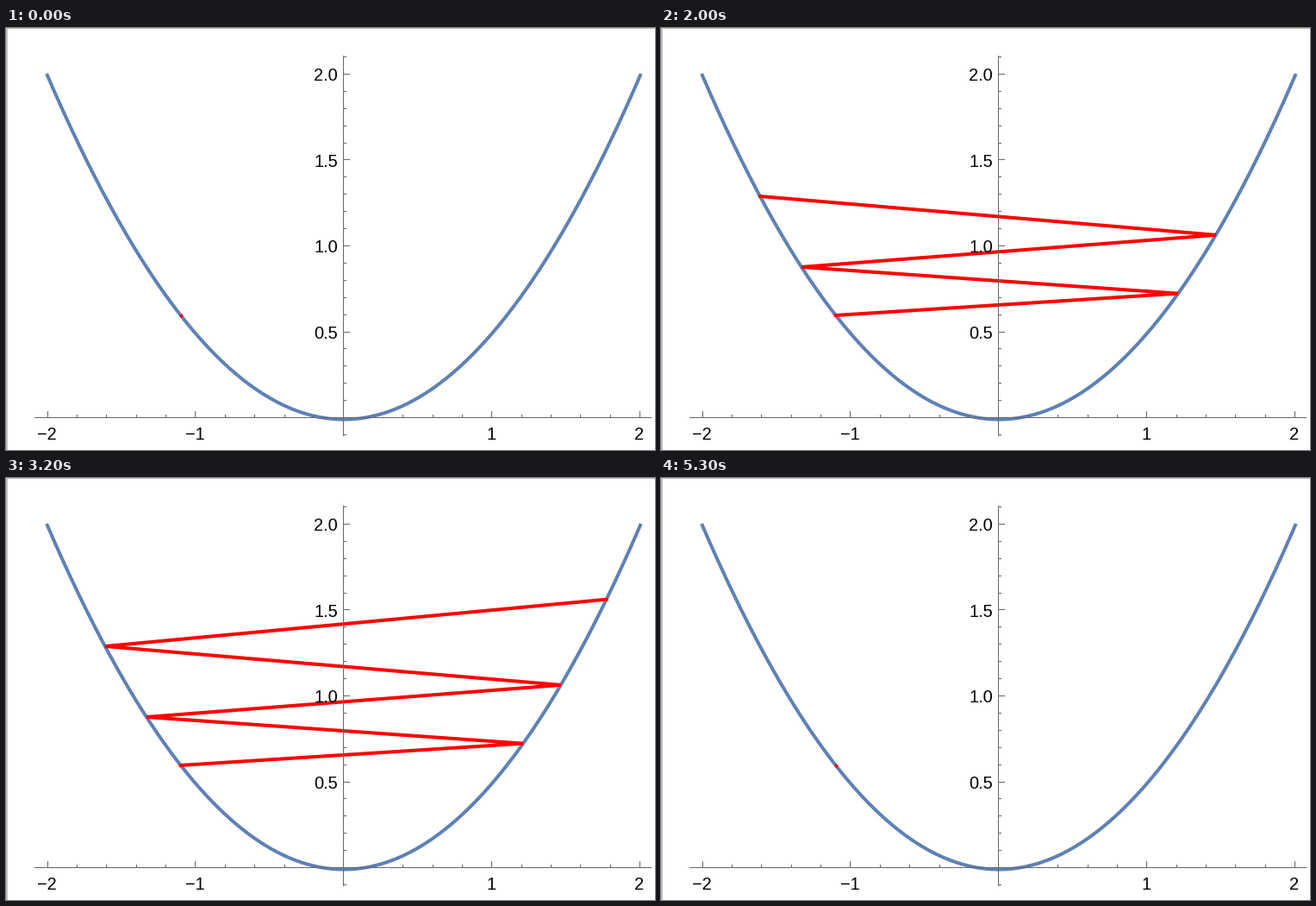
Animation of 753x489 px, one loop 6 s. Source, as a matplotlib script:

```python
import numpy as np
import matplotlib.pyplot as plt
from matplotlib.animation import FuncAnimation
from matplotlib.patches import Rectangle

W, H, DPI = 753, 489, 96
PX = 72 / DPI              # one pixel in points
STEP, LOOP = 100, 6000     # ms
CURVE, AXIS, EDGE = "#5e81b5", "#666666", "#bebebe"
AXIS_X, AXIS_Y = 391, 451  # pixel column and row of the axes

fig = plt.figure(figsize=(W / DPI, H / DPI), dpi=DPI, facecolor="white")
ax = fig.add_axes([0, 0, 1, 1])
ax.set_xlim(0, W)
ax.set_ylim(H, 0)
ax.axis("off")


def to_px(x):
    """Pixel position of the point of the parabola y = x²/2."""
    return 391.9 + 172 * x, 453.6 - 199.4 * x**2 / 2


def box(x, y, w, h, color=AXIS, z=5):
    ax.add_patch(Rectangle((x, y), w, h, fc=color, lw=0, antialiased=False, zorder=z))


def label(x, y, text, ha):
    ax.text(x, y, text, ha=ha, va="baseline", color="black", zorder=6,
            fontfamily="Liberation Sans", fontsize=20 * PX)


def draw_axes():
    box(33, AXIS_Y, 716, 1)
    box(AXIS_X, 32, 1, 441)
    for i in range(-10, 11):
        if i:
            size = 7 if i % 5 == 0 else 3
            box(int(391.9 + 171.9 * i / 5), AXIS_Y - size, 1, size)
    for i in range(-1, 22):
        if i:
            size = 7 if i % 5 == 0 else 3
            box(AXIS_X + 1, round(AXIS_Y - 19.9 * i), size, 1)
    for v in (-2, -1, 1, 2):
        label(390.8 + 171.9 * v, 477, str(v).replace("-", "\u2212"), "center")
    for v in (0.5, 1.0, 1.5, 2.0):
        label(385, 459.3 - 199 * v, f"{v:.1f}", "right")


box(0, 0, W, 1, EDGE, 0)
box(0, 0, 2, H, EDGE, 0)
draw_axes()
ax.plot(*to_px(np.linspace(-2, 2, 300)), color=CURVE, lw=4 * PX,
        solid_capstyle="projecting", zorder=2)

# Each bounce lands on the other side, 1.1 times as far out.
path_x, path_y = to_px(-1.1 * (-1.1) ** np.arange(7))
dot, = ax.plot(path_x[:1], path_y[:1], "o", color="red", ms=4 * PX, mew=0, zorder=3)
zigzag, = ax.plot([], [], color="red", lw=4 * PX, zorder=3,
                  solid_capstyle="projecting", solid_joinstyle="bevel")

GROW = [700, 1200, 1600, 2000, 2400, 2800]
SHRINK = [3200, 3600, 4000, 4400, 4800, 5300]


def update(frame):
    t = frame * STEP
    count = sum(t >= g for g in GROW) - sum(t >= s for s in SHRINK)
    dot.set_visible(count == 0)
    zigzag.set_visible(count > 0)
    zigzag.set_data(path_x[:count + 1], path_y[:count + 1])
    return dot, zigzag


anim = FuncAnimation(fig, update, frames=LOOP // STEP, interval=STEP,
                     repeat=True, repeat_delay=0)
plt.show()
```
